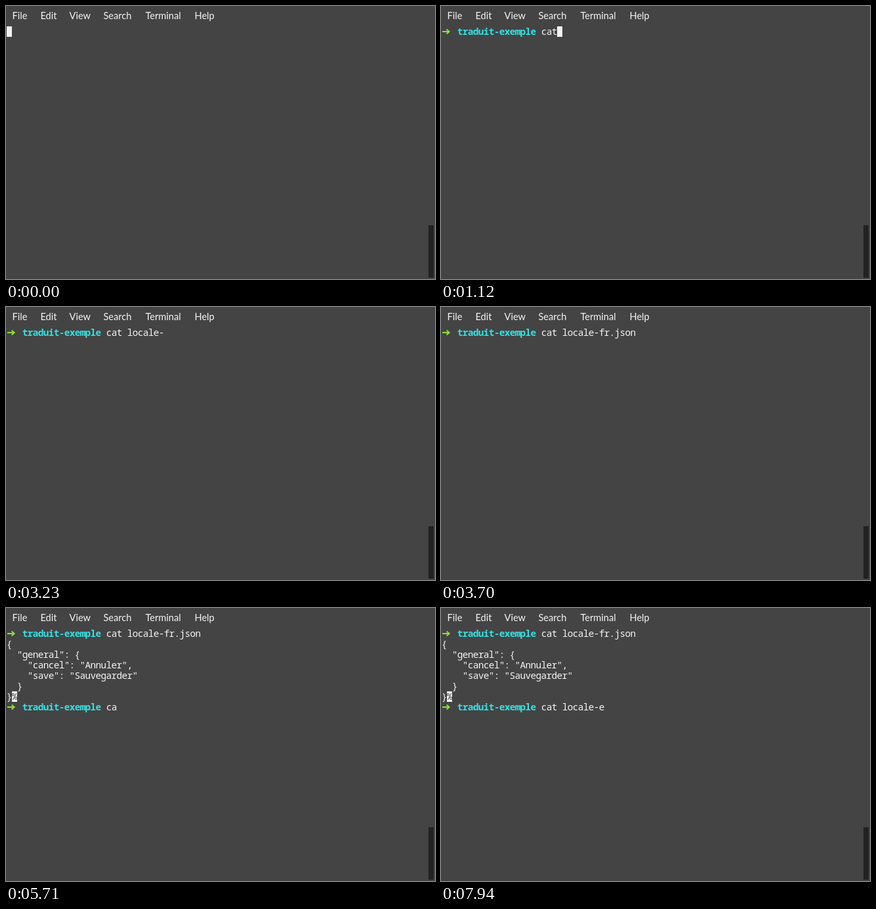
Animation, 654 px wide and 416 px high, one loop 8 s. Source, as an HTML page:

```html
<!DOCTYPE html>
<html lang="en">
<head>
<meta charset="utf-8">
<title>Terminal</title>
<style>
  html, body { margin: 0; width: 100%; height: 100%; overflow: hidden; background: #444; }
  svg { display: block; width: 654px; height: 416px; }
  text { fill: #f4f4f2; white-space: pre; }
  .menu { font: 14.6px Lato, "Noto Sans", sans-serif; }
  .term {
    font: 500 14.4px "Noto Sans Mono", "DejaVu Sans Mono", monospace;
    letter-spacing: calc(8px - 0.6em);
  }
  .bold { font-weight: bold; }
</style>
</head>
<body>
<svg id="stage" viewBox="0 0 654 416" xmlns="http://www.w3.org/2000/svg"></svg>
<script>
const LOOP = 8000, CELL = 8, LINE = 16, LEFT = 1, TOP = 31, BASELINE = 13;
const PROMPT_COLS = 19, SECOND_ROW = 7;
const LIGHT = '#f2f2f0', BACK = '#444444';
const stage = document.getElementById('stage');

const colX = col => LEFT + col * CELL;
const rowY = row => TOP + row * LINE;

function add(tag, attrs, parent = stage, content = '') {
  const node = document.createElementNS('http://www.w3.org/2000/svg', tag);
  for (const key in attrs) node.setAttribute(key, attrs[key]);
  node.textContent = content;
  return parent.appendChild(node);
}

function print(row, col, content, parent = stage, attrs = {}) {
  return add('text', { class: 'term', x: colX(col) - 0.3, y: rowY(row) + BASELINE, ...attrs }, parent, content);
}

function cell(row, col, parent = stage) {
  return add('rect', { x: colX(col), y: rowY(row), width: CELL, height: LINE, fill: LIGHT }, parent);
}

function promptLine(row) {
  const group = add('g', {});
  const y = rowY(row) + 8;
  add('path', {
    d: `M2 ${y}H12M8.6 ${y - 3.6}L12.6 ${y}L8.6 ${y + 3.6}`,
    fill: 'none', stroke: '#8ae234', 'stroke-width': 2
  }, group);
  print(row, 3, 'traduit-exemple', group, { class: 'term bold', style: 'fill:#34e2e2' });
  return { group, input: print(row, PROMPT_COLS, '', group) };
}

// Typing steps: time at which the command reaches each length
const FIRST = {
  command: 'cat locale-fr.json',
  steps: [[630, 1], [870, 2], [1120, 3], [1290, 4], [1510, 5], [1710, 6], [1850, 7], [1980, 8],
          [2190, 9], [2490, 10], [3230, 11], [3390, 12], [3540, 13], [3700, 18]]
};
const SECOND = {
  command: 'cat locale-e',
  steps: [[5550, 1], [5710, 2], [5880, 3], [6190, 5], [6420, 6], [6720, 7], [6890, 8],
          [7090, 9], [7360, 10], [7770, 11], [7940, 12]]
};

function typed({ command, steps }, t) {
  let length = 0;
  for (const [time, count] of steps) if (t >= time) length = count;
  return command.slice(0, length);
}

add('rect', { width: 654, height: 416, fill: BACK });
const menu = { File: 10, Edit: 53, View: 97, Search: 149, Terminal: 213, Help: 288 };
for (const label in menu) add('text', { class: 'menu', x: menu[label] - 0.5, y: 20 }, stage, label);
add('rect', { x: 644, y: 334, width: 8, height: 80, fill: '#222222' });

const first = promptLine(0);
const second = promptLine(SECOND_ROW);
const output = add('g', {});
['{', '  "general": {', '    "cancel": "Annuler",', '    "save": "Sauvegarder"', '  }', '}']
  .forEach((line, i) => print(i + 1, 0, line, output));
cell(6, 1, output);
print(6, 1, '%', output, { style: `fill:${BACK}` });
const cursor = cell(0, 0);

const show = (node, visible) => node.setAttribute('display', visible ? 'inline' : 'none');

function render(t) {
  const a = typed(FIRST, t), b = typed(SECOND, t);
  show(first.group, t >= 100);
  show(output, t >= 4040);
  show(second.group, t >= 4240);
  first.input.textContent = a;
  second.input.textContent = b;

  const lower = t >= 4040;
  const waiting = t < 100 || (lower && t < 4240);
  const col = waiting ? 0 : PROMPT_COLS + (lower ? b : a).length;
  cursor.setAttribute('x', colX(col));
  cursor.setAttribute('y', rowY(lower ? SECOND_ROW : 0));
  show(cursor, t < 1710 || (lower && t < 5550));
}

const start = performance.now();
function tick() {
  render((performance.now() - start) % LOOP);
  requestAnimationFrame(tick);
}
render(0);
requestAnimationFrame(tick);
</script>
</body>
</html>
```
